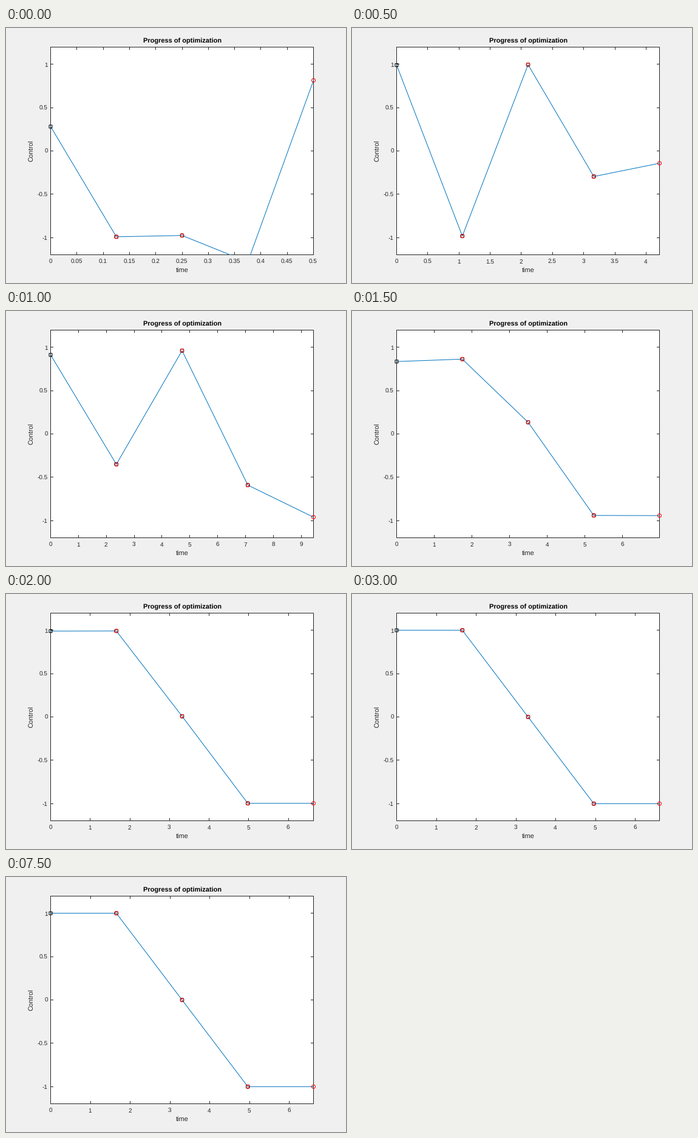
A matplotlib script for the animation above (8000 ms loop, 560 by 420 pixels).

```python
import numpy as np
import matplotlib.pyplot as plt
from matplotlib.animation import FuncAnimation
from matplotlib.patches import Circle, Rectangle

plt.rcParams["font.family"] = "Liberation Sans"
plt.rcParams["text.hinting"] = "none"
plt.rcParams["path.snap"] = False

W, H, DPI = 560, 420, 72
LEFT, RIGHT, TOP, BOTTOM = 73.5, 506.5, 31.5, 373.5
MID, UNIT = 202.5, 142.8
INK, BLUE = "#262626", "#0072BD"
STEP_MS, FRAMES = 500, 16

# Early iterates: end time and control at the equally spaced nodes
GUESSES = [
    (0.5, [0.281, -0.99, -0.975, -1.28, 0.814]),
    (4.215, [0.99, -0.982, 0.995, -0.295, -0.142]),
    (9.44, [0.912, -0.35, 0.961, -0.59, -0.96]),
    (6.98, [0.835, 0.863, 0.135, -0.94, -0.942]),
]
NODES = np.linspace(0, 1, 5)
BEST_TIME = 6.61
BEST = np.clip(2 - 4 * NODES, -1, 1)
DECAY = 0.06

fig = plt.figure(figsize=(W / DPI, H / DPI), dpi=DPI, facecolor="#F0F0F0")
ax = fig.add_axes([0, 0, 1, 1])


def iterate(k):
    """End time and controls; the error of the last guess decays."""
    last = len(GUESSES) - 1
    time, controls = GUESSES[min(k, last)]
    err = DECAY ** max(k - last, 0)
    if k <= last:
        return time, np.array(controls)
    return (BEST_TIME + err * (time - BEST_TIME),
            BEST + err * (controls - BEST))


def to_x(s):
    return LEFT + (RIGHT - LEFT) * s


def to_y(u):
    return MID - UNIT * u


def pixel(v):
    return np.floor(v + 1e-6) + 0.5


def seg(xs, ys, color=INK, **kw):
    return ax.plot(xs, ys, color=color, lw=1, solid_capstyle="butt", **kw)[0]


def label(x, y, s, size=10, ha="center", color=INK, **kw):
    ax.text(x, y, s, fontsize=size, ha=ha, va="baseline", color=color,
            rotation_mode="anchor", **kw)


def draw_axes(end):
    step = next(s for s in (0.05, 0.1, 0.2, 0.5, 1) if end / s <= 10)
    for t in np.arange(0, end + 1e-6, step):
        x = to_x(t / end)
        px = pixel(x)
        seg([px, px], [BOTTOM, BOTTOM - 4.5])
        seg([px, px], [TOP, TOP + 4.5])
        label(x - 0.5, 388, f"{t:g}")
    for v in np.arange(-1, 1.5, 0.5):
        y = pixel(to_y(v))
        seg([LEFT, LEFT + 4.5], [y, y])
        seg([RIGHT, RIGHT - 4.5], [y, y])
        label(68.7, round(to_y(v) + 3.9), f"{v:g}", ha="right")
    seg([LEFT, RIGHT, RIGHT, LEFT, LEFT], [TOP, TOP, BOTTOM, BOTTOM, TOP],
        solid_joinstyle="miter")
    label(290.6, 25, "Progress of optimization", 11, color="black",
          weight="bold")
    label(290, 403, "time", 11)
    label(45, MID, "Control", 11, rotation=90)


def draw_curve(controls):
    xs, ys = to_x(NODES), to_y(controls)
    seg(xs, ys, BLUE, zorder=3).set_clip_path(
        Rectangle((73, 31), 434, 343, transform=ax.transData))
    last = len(xs) - 1
    for i, (x, y) in enumerate(zip(xs, ys)):
        if not TOP <= y <= BOTTOM:
            continue
        if i < last:
            ax.add_patch(Rectangle((x - 2.5, y - 2.5), 5, 5, fill=False,
                                   ec="black", lw=1, zorder=4))
        if i > 0:
            ax.add_patch(Circle((x, y), 3, fill=False, ec="red",
                                lw=1, zorder=5))


def draw(frame):
    ax.clear()
    ax.set_xlim(0, W)
    ax.set_ylim(H, 0)
    ax.axis("off")
    end, controls = iterate(frame)
    ax.add_patch(Rectangle((73, 31), 434, 343, fc="white", lw=0, zorder=0))
    draw_axes(end)
    draw_curve(controls)
    return []


anim = FuncAnimation(fig, draw, frames=FRAMES, interval=STEP_MS,
                     init_func=lambda: [], repeat=True, repeat_delay=0)
plt.show()
```
